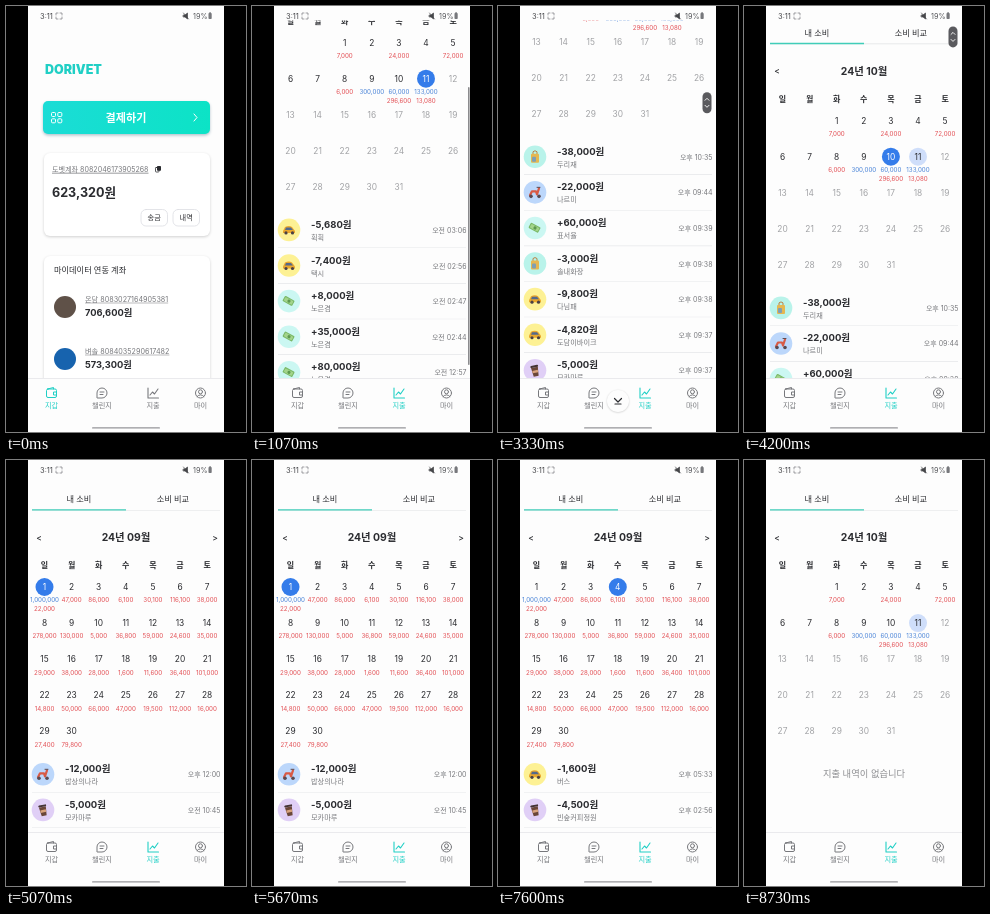
An HTML page with a canvas for the animation above (8790 ms loop, 240 by 426 pixels).

```html
<!DOCTYPE html>
<html lang="ko">
<head>
<meta charset="utf-8">
<style>
html, body { margin: 0; width: 100%; height: 100%; overflow: hidden; background: #000; }
canvas { display: block; width: 100vw; height: 100vh; }
</style>
</head>
<body>
<canvas></canvas>
<script>
const LOOP = 8790, W = 240, H = 426;
const FONT = 'Inter, "Noto Sans CJK KR", "Noto Sans CJK JP", "Noto Sans CJK", sans-serif';
const INK = '#2b2c30', GREY = '#77787c', PALE = '#a2a3a6', TEAL = '#20cfc5', RED = '#e35257', BLUE = '#4d86d8';
const canvas = document.querySelector('canvas'), c = canvas.getContext('2d');

function text(str, x, y, size, color = INK, weight = 400, align = 'left') {
  c.font = `${weight} ${size}px ${FONT}`;
  c.fillStyle = color;
  c.textAlign = align;
  c.fillText(str, x, y);
  return c.measureText(str).width;
}
function rect(x, y, w, h, fill, r = 0) {
  c.fillStyle = fill;
  c.beginPath(); c.roundRect(x, y, w, h, r); c.fill();
}
function box(x, y, w, h, color, r = 0, width = 0.8) {
  c.strokeStyle = color; c.lineWidth = width;
  c.beginPath(); c.roundRect(x, y, w, h, r); c.stroke();
}
function disc(x, y, r, fill) {
  c.fillStyle = fill;
  c.beginPath(); c.arc(x, y, r, 0, 7); c.fill();
}
function path(d, color, width = 1, fill) {
  const p = new Path2D(d);
  c.lineCap = c.lineJoin = 'round';
  if (fill) { c.fillStyle = fill; c.fill(p); }
  if (color) { c.strokeStyle = color; c.lineWidth = width; c.stroke(p); }
}
function at(x, y, draw) {
  c.save(); c.translate(x, y); draw(); c.restore();
}
function shadowed(color, blur, dy, draw) {
  const k = c.getTransform().a;
  c.save();
  c.shadowColor = color; c.shadowBlur = blur * k; c.shadowOffsetY = dy * k;
  draw();
  c.restore();
}

const icons = {
  taxi: ['#fdf194', () => {
    path('M-6 1 L-4 -3 Q0 -5 3 -3 L6 1 V3 H-6Z', null, 0, '#e9a62c');
    path('M-3 -2.5 L2 -2.5 L4 0 H-4Z', null, 0, '#53698c');
    disc(-3, 3, 1.6, '#4a4044'); disc(3.5, 3, 1.6, '#4a4044');
  }],
  cash: ['#cbf7f2', () => {
    c.rotate(0.5);
    rect(-6, -3, 11, 6, '#79b866', 1); rect(-5, -2, 9, 4, '#a3d48b', 1); disc(0, 0, 1.6, '#5c984f');
  }],
  bag: ['#b9f3ea', () => {
    path('M-2 -2 V-5 Q0 -7 2 -5 V-2', '#b98245');
    rect(-4, -3, 8, 9, '#e5b751', 1); rect(-3, 0, 4, 5, '#7f9fb4', 1);
  }],
  scooter: ['#bcd7fb', () => {
    path('M-5 3 L-3 -1 H1 L2 2 L4 -4', '#d85a45', 2.2);
    path('M2 -5 H5', '#5d4b50'); disc(-4, 4, 1.8, '#5b4a50'); disc(4, 4, 1.8, '#5b4a50');
  }],
  cup: ['#e0cff6', () => {
    c.rotate(-0.2);
    path('M-3.5 -3 H3.5 L2.5 6 H-2.5Z', null, 0, '#6a4638'); rect(-4, -5, 8, 2, '#443335', 1);
    rect(-2.8, 0, 5.6, 2.5, '#d8a27c');
  }]
};

const MONTHS = {
  9: { first: 0, days: 30, today: 0, spent: [22000, 47000, 86000, 6100, 30100, 116100, 38000,
       278000, 130000, 5000, 36800, 59000, 24600, 35000, 29000, 38000, 28000, 1600, 11600, 36400, 101000,
       14800, 50000, 66000, 47000, 19500, 112000, 16000, 27400, 79800], earned: { 1: 1000000 } },
  10: { first: 2, days: 31, today: 11,
        spent: [7000, 0, 24000, 0, 72000, 0, 0, 6000, 0, 296600, 13080],
        earned: { 9: 300000, 10: 60000, 11: 133000 } }
};
const LISTS = {
  '10/11': [
    ['taxi', -5680, '휙휙', '오전 03:06'], ['taxi', -7400, '택시', '오전 02:56'],
    ['cash', 8000, '노은겸', '오전 02:47'], ['cash', 35000, '노은겸', '오전 02:44'],
    ['cash', 80000, '노은겸', '오전 12:57'], ['cash', 10000, '노은겸', '오전 12:51']],
  '10/10': [
    ['bag', -38000, '두리재', '오후 10:35'], ['scooter', -22000, '나르미', '오후 09:44'],
    ['cash', 60000, '표서율', '오후 09:39'], ['bag', -3000, '솔내화장', '오후 09:38'],
    ['taxi', -9800, '다님패', '오후 09:38'], ['taxi', -4820, '도담이바이크', '오후 09:37'],
    ['cup', -5000, '모카마루', '오후 09:37'], ['bag', -12000, '두리재', '오후 08:20'],
    ['taxi', -8600, '택시', '오후 07:52'], ['cup', -4500, '모카마루', '오후 06:15'],
    ['scooter', -18000, '나르미', '오후 05:40'], ['bag', -27000, '솔내화장', '오후 04:31']],
  '9/1': [
    ['scooter', -12000, '밥상의나라', '오후 12:00'], ['cup', -5000, '모카마루', '오전 10:45'],
    ['cup', -5000, '모카마루', '오전 09:30']],
  '9/4': [['taxi', -1600, '버스', '오후 05:33'], ['cup', -4500, '빈숲커피정원', '오후 02:56']]
};
const money = n => Math.abs(n).toLocaleString('en-US');

// [start time, month, selected day]; the wallet comes first
const STEPS = [[470, 10, 0], [670, 10, 11], [2550, 10, 10], [4400, 9, 0], [4800, 9, 1], [5900, 9, 4], [8470, 10, 0]];

function ease(t, from, to) {
  const u = Math.min(1, Math.max(0, (t - from) / (to - from)));
  return u * u * (3 - 2 * u);
}
const scrollAt = t =>
  138 * (ease(t, 800, 1248) - ease(t, 1550, 2000)) +
  300 * (ease(t, 2900, 3713) - ease(t, 3850, 4250));

function account(y, name, amount, color) {
  disc(59, y, 11, color);
  const w = text(name, 79, y - 5.5, 7.2, GREY);
  rect(79, y - 4.3, w, 0.6, GREY);
  text(amount, 79, y + 9, 9.3, INK, 700);
}

function wallet() {
  text('DORIVET', 39, 67.5, 12.5, TEAL, 900);
  const g = c.createLinearGradient(37, 0, 204, 0);
  g.addColorStop(0, '#1bdcd6'); g.addColorStop(1, '#0ce3c6');
  shadowed('rgba(0,60,90,.3)', 3, 1.5, () => rect(37, 95, 167, 33, g, 5));
  for (const x of [45.5, 51.8]) for (const y of [106.5, 112.8]) box(x, y, 4, 4, '#fff', 1, 1);
  text('결제하기', 120, 115.5, 11.1, '#fff', 700, 'center');
  path('M188 108 L191 111.5 L188 115', '#fff');

  for (const [y, h] of [[147, 83], [250, 150]])
    shadowed('rgba(0,0,0,.18)', 3, 1, () => rect(38, y, 166, h, '#fff', 6));
  const w = text('도벳계좌 8082046173905268', 46, 165.5, 7.1, GREY);
  rect(46, 166.8, w, 0.6, GREY);
  box(149.5, 161.5, 3.5, 4.5, INK, 0.7); rect(151, 160, 4, 4.7, INK, 0.7);
  text('623,320원', 46, 190.5, 12.6, INK, 700);
  for (const [x, label] of [[135, '송금'], [167, '내역']]) {
    box(x, 203.5, 26.5, 16.5, '#dcdde2', 5);
    text(label, x + 13.2, 214.3, 7.2, INK, 400, 'center');
  }
  text('마이데이터 연동 계좌', 48, 266.5, 8.2, INK, 500);
  account(301, '온담 8083027164905381', '706,600원', '#5f5148');
  account(353, '벼솔 8084035290617482', '573,300원', '#1763ae');
}

function calendar(month, selected) {
  const m = MONTHS[month], colX = i => 38.5 + 27.1 * i;
  text('내 소비', 73, 42, 8.2, INK, 500, 'center');
  text('소비 비교', 167, 42, 8.2, INK, 500, 'center');
  rect(26, 50, 188, 0.6, '#dfe2e4');
  rect(26, 49.2, 94, 1.4, '#40cdb9');
  text(`24년 ${String(month).padStart(2, '0')}월`, 120, 81, 10.4, INK, 700, 'center');
  text('<', 33, 80.5, 8.5, INK, 500, 'center');
  if (month === 9) text('>', 209, 80.5, 8.5, INK, 500, 'center');
  [...'일월화수목금토'].forEach((d, i) => text(d, colX(i), 108, 8, INK, 700, 'center'));

  for (let day = 1; day <= m.days; day++) {
    const cell = day - 1 + m.first, x = colX(cell % 7), y = 127 + 36.1 * Math.floor(cell / 7);
    let color = m.today && day > m.today ? PALE : INK;
    if (day === selected) { disc(x, y, 9, '#347cea'); color = '#fff'; }
    else if (day === m.today) disc(x, y, 9, '#cfdefa');
    text(day, x, y + 3, 8.4, color, 400, 'center');
    let line = y + 15.3;
    for (const [sum, tint] of [[m.earned[day], BLUE], [m.spent[day - 1], RED]]) {
      if (!sum) continue;
      text(money(sum), x, line, 6.2, tint, 400, 'center');
      line += 9;
    }
  }
}

function entries(list) {
  if (!list) return text('지출 내역이 없습니다', 120, 316.5, 9.3, '#8d8e91', 400, 'center');
  list.forEach(([kind, amount, name, time], i) => {
    const y = 314.3 + 35.6 * i, [bg, draw] = icons[kind];
    disc(37, y, 11.3, bg);
    at(37, y, draw);
    text(`${amount < 0 ? '-' : '+'}${money(amount)}원`, 59, y - 2, 9.5, INK, 700);
    text(name, 59, y + 10, 7.2, GREY);
    text(time, 214.5, y + 3, 7, GREY, 400, 'right');
    rect(26, y + 17.6, 188, 0.6, '#e6e7ea');
  });
}

function scrollMarks(t, scroll) {
  if (t > 800 && t < 2500) rect(216, 16 + scroll * 0.72, 1.6, 278, '#8b8b8e', 0.8);
  if (t > 2900 && t < 4300) {
    const y = 25 + scroll * 0.436;
    rect(204.5, y - 10, 9, 21, '#5a5a5e', 4.5);
    path(`M207 ${y - 2} l2 -2 l2 2 M207 ${y + 3} l2 2 l2 -2`, '#fff', 0.9);
  }
}

function statusBar() {
  rect(22, 0, 196, 14.5, '#fdfdfd');
  text('3:11', 34, 12.5, 7.5, '#46474a');
  path('M50 9 v-2 h2 M54 7 h2 v2 M56 11 v2 h-2 M52 13 h-2 v-2', '#77787c', 0.7);
  path('M177.5 9 h1.5 l2.5 -2 v6 l-2.5 -2 h-1.5z M177.5 7 l5 6', '#46474a', 0.7, '#46474a');
  text('19%', 187, 12.5, 7.2, '#55565a');
  rect(202.5, 7, 3.2, 6, '#77787c', 0.8); rect(203.3, 6.2, 1.6, 1, '#77787c');
}

function navBar(active) {
  rect(22, 372, 196, 54, '#fdfdfd');
  rect(22, 372, 196, 0.7, '#e4e5e8');
  [['지갑', 45.5, col => { box(-5, -4, 10, 8.5, col, 1.5, 1); path('M-4 -4 L2 -5.5 V-4 M5 -1 H2 V2 H5', col); }],
   ['챌린지', 96, col => { path('M-5 4.5 V0 A5 5 0 1 1 0 5 H-4.5Z M-2 -1 H2 M-2 1.5 H1', col); }],
   ['지출', 147, col => { path('M-5 -5 V5 H5.5 M-3 2 L-0.5 -1 L1.5 1 L5 -4', col, 1.1); }],
   ['마이', 194.5, col => {
     path('M5 0 A5 5 0 1 1 -5 0 A5 5 0 1 1 5 0 M2 -1.2 A2 2 0 1 1 -2 -1.2 A2 2 0 1 1 2 -1.2 M-3.4 3.5 Q0 0 3.4 3.5', col);
   }]
  ].forEach(([label, x, draw], i) => {
    const col = i === active ? TEAL : '#77787c';
    at(x, 387, () => draw(col));
    text(label, x, 401.8, 7.2, col, i === active ? 500 : 400, 'center');
  });
  rect(86, 421.2, 68, 1.4, '#96969a', 0.7);
}

function frame(now) {
  const t = now % LOOP, dpr = devicePixelRatio || 1;
  const w = Math.round(innerWidth * dpr), h = Math.round(innerHeight * dpr);
  if (canvas.width !== w || canvas.height !== h) { canvas.width = w; canvas.height = h; }
  c.setTransform(w / W, 0, 0, h / H, 0, 0);
  rect(0, 0, W, H, '#000');
  c.save();
  c.beginPath(); c.rect(22, 0, 196, H); c.clip();
  rect(22, 0, 196, H, '#fdfdfd');
  const step = STEPS.filter(s => s[0] <= t).pop();
  if (step) {
    const [, month, day] = step, scroll = scrollAt(t);
    at(0, -scroll, () => { calendar(month, day); entries(LISTS[`${month}/${day}`]); });
    scrollMarks(t, scroll);
  } else wallet();
  statusBar();
  navBar(step ? 2 : 0);
  if (t > 2900 && t < 3850) {
    shadowed('rgba(0,0,0,.2)', 2, 0.5, () => disc(120, 395, 11, '#fdfdfd'));
    path('M116.5 392.5 L120 396 L123.5 392.5 M117 398 H123', INK, 1.2);
  }
  c.restore();
  requestAnimationFrame(frame);
}
requestAnimationFrame(frame);
</script>
</body>
</html>
```
